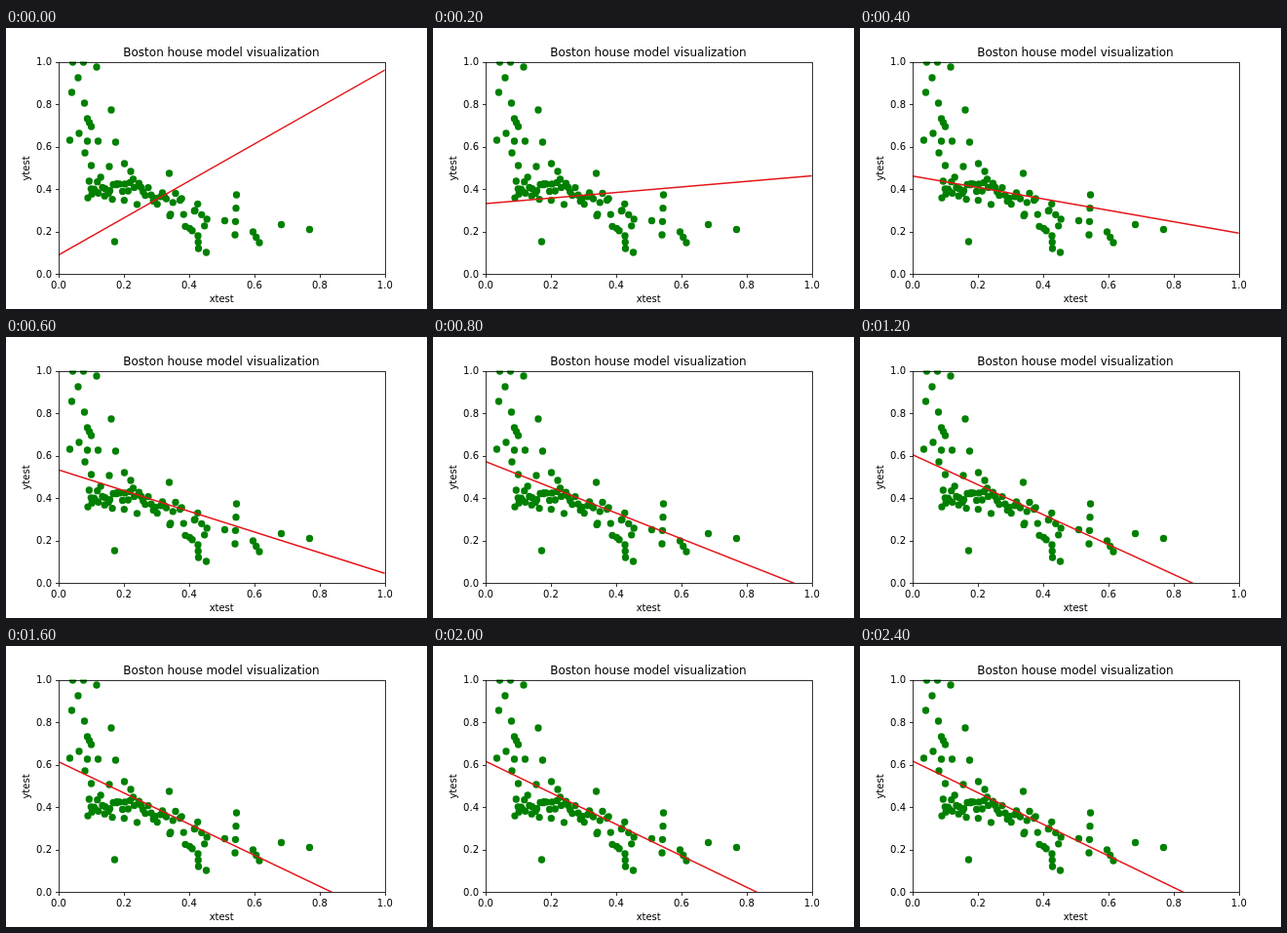
Recreate the animation shown at these times as an HTML page. Size 432 by 288 pixels, loop 2500 ms.

```html
<!DOCTYPE html>
<html lang="en">
<head>
<meta charset="utf-8">
<style>
  html, body { margin: 0; width: 100%; height: 100%; overflow: hidden; background: #fff; }
  svg { display: block; }
  text { font-family: "DejaVu Sans", sans-serif; font-size: 10px; text-anchor: middle; }
  .title { font-size: 12px; }
  .end { text-anchor: end; }
  .axis { fill: none; stroke: #000; stroke-width: 0.8; }
</style>
</head>
<body>
<svg width="432" height="288" viewBox="0 0 432 288">
  <clipPath id="plot"><rect x="54" y="34.56" width="334.8" height="217.44"/></clipPath>
  <g clip-path="url(#plot)">
    <g id="dots" fill="#008000"></g>
    <line id="fit" stroke="#e4161a" stroke-width="1.5"/>
  </g>
  <g id="ticks"></g>
  <rect class="axis" x="54.5" y="35.5" width="335" height="217"/>
  <text class="title" x="221" y="28.5">Boston house model visualization</text>
  <text x="221.2" y="280.6">xtest</text>
  <text transform="translate(24 144) rotate(-90)">ytest</text>
</svg>
<script>
const STEP_MS = 100, STEPS = 25, CLOUD_SIZE = 56;
const $ = id => document.getElementById(id);
const px = x => 54 + 334.8 * x;
const py = y => 252 - 217.44 * y;
const snap = v => Math.floor(v + 0.5) + 0.5;

function add(parent, tag, attrs, text = '') {
  const el = document.createElementNS('http://www.w3.org/2000/svg', tag);
  for (const [key, value] of Object.entries(attrs)) el.setAttribute(key, value);
  el.textContent = text;
  parent.append(el);
}

const dot = (cx, cy) => add($('dots'), 'circle', { cx, cy, r: 3.65 });

// Evenly spaced dots between two points
function strand(count, x0, y0, x1, y1) {
  for (let i = 0; i < count; i++) {
    const t = i / (count - 1);
    dot(x0 + (x1 - x0) * t, y0 + (y1 - y0) * t);
  }
}

let seed = 7;
const random = () => (seed = seed * 16807 % 2147483647) / 2147483647;

// Dense band that bends down and widens to the right
function cloud() {
  for (let i = 0; i < CLOUD_SIZE; i++) {
    const t = ((i + random()) / CLOUD_SIZE) ** 1.2;
    const spread = 12 + 6 * t;
    dot(84 + 123 * t, 164 + 42 * t ** 2.5 + spread * (2 * random() - 1));
  }
}

const outliers = [
  [68.5, 35], [79.5, 35], [93, 40], [74, 51], [67.5, 66], [80.5, 77],
  [108, 84], [75, 108], [65.5, 115], [83.5, 116], [94.5, 116], [112.5, 117],
  [81, 128], [87.5, 141], [106, 142], [121.5, 139], [128, 147],
  [167.5, 149], [111.5, 219], [205.5, 230], [224.5, 197.5],
  [282.5, 201.5], [311.5, 206.5]
];
outliers.forEach(([x, y]) => dot(x, y));
strand(3, 83.5, 93, 87.5, 101);
strand(3, 197, 213, 197.5, 226);
strand(4, 236.5, 171, 235, 212);
strand(3, 253.5, 209, 260, 220);
cloud();

for (let i = 0; i <= 5; i++) {
  const value = i / 5, label = value.toFixed(1);
  const x = px(value), y = py(value);
  add($('ticks'), 'path', { class: 'axis', d: `M${snap(x)} 252.5v3.5M54.5 ${snap(y)}h-3.5` });
  add($('ticks'), 'text', { x, y: 266.6 }, label);
  add($('ticks'), 'text', { class: 'end', x: 47, y: y + 3.8 }, label);
}

// Gradient descent: both coefficients converge geometrically
function draw(time) {
  const step = Math.floor(time / STEP_MS) % STEPS;
  const error = 0.7365 ** step;
  const intercept = 0.617 - 0.528 * error;
  const slope = -0.746 + 1.618 * error;
  const ends = { x1: px(0), y1: py(intercept), x2: px(1), y2: py(intercept + slope) };
  for (const [key, value] of Object.entries(ends)) $('fit').setAttribute(key, value);
}

const start = performance.now();
function tick() {
  draw(performance.now() - start);
  requestAnimationFrame(tick);
}
tick();
</script>
</body>
</html>
```
